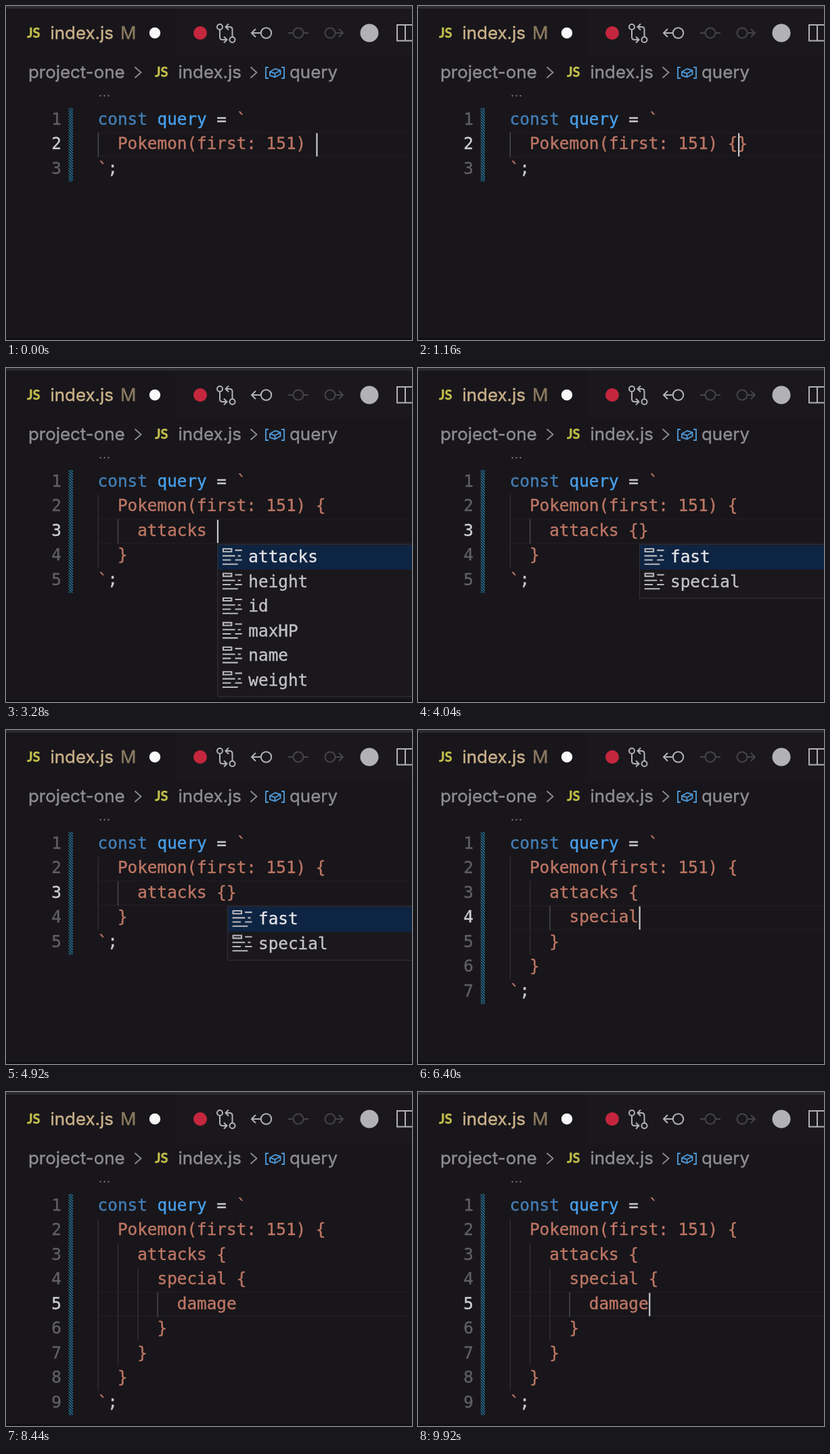
Animation, 600 px wide and 495 px high, one loop 10000 ms. Source, as an HTML page with a canvas:

```html
<!DOCTYPE html>
<html lang="en">
<head>
<meta charset="utf-8">
<title>Query completion</title>
<style>
html, body { margin: 0; width: 100%; height: 100%; overflow: hidden; background: #18161a; }
canvas { display: block; }
</style>
</head>
<body>
<canvas id="stage" width="600" height="495"></canvas>
<script>
const ctx = document.getElementById('stage').getContext('2d');
const LOOP = 10000, BLINK = 500;
const LEFT = 135.6, TOP = 151, ROW = 36.45, COL = 14.647;
const MONO = '24.33px "DejaVu Sans Mono", monospace';
const SANS = '25.9px Inter, sans-serif';
const BADGE = 'bold 20px Lato, sans-serif';
const BG = '#18161a', SALMON = '#bd7664', PLAIN = '#c8c8ca', ICON = '#b2b1b5', DIM = '#454448';

const ROOT = 'Pokemon(first: 151) ';
const OPEN = 'Pokemon(first: 151)';
const CREATURE = ['attacks', 'height', 'id', 'maxHP', 'name', 'weight'];
const ATTACKS = ['fast', 'special'];
const ATTACK = ['damage', 'id', 'name'];

// Each step: start time, nested lines down to the caret, suggestions, selected row.
const steps = [
  [-300, [ROOT]],
  [1040, [ROOT + '{']],
  [1180, [ROOT + '{'], CREATURE, 0],
  [2520, [OPEN, 'attacks']],
  [3080, [OPEN, 'attacks ']],
  [3180, [OPEN, 'attacks '], CREATURE, 0],
  [3400, [OPEN, 'attacks {']],
  [3560, [OPEN, 'attacks {'], ATTACKS, 0],
  [5500, [OPEN, 'attacks {'], ATTACKS, 1],
  [6200, [OPEN, 'attacks', 'special']],
  [6640, [OPEN, 'attacks', 'special ']],
  [6740, [OPEN, 'attacks', 'special '], ATTACKS, 0],
  [6840, [OPEN, 'attacks', 'special {']],
  [6960, [OPEN, 'attacks', 'special {'], ATTACK, 0],
  [7700, [OPEN, 'attacks', 'special', 'damage']]
].map(([at, path, menu, pick]) => ({ at, path, menu, pick }));

// The caret restarts its blink only when the text changes.
steps.forEach((step, i) => {
  const before = steps[i - 1];
  step.typedAt = before && before.path.join() === step.path.join() ? before.typedAt : step.at;
});

const colX = col => LEFT + col * COL;
const rowY = row => TOP + row * ROW;

// A hairline outline gives the text its slightly heavy weight.
function text(str, x, y, color, font = MONO, align = 'left') {
  ctx.font = font;
  ctx.fillStyle = ctx.strokeStyle = color;
  ctx.textAlign = align;
  ctx.lineWidth = 0.4;
  ctx.fillText(str, x, y);
  ctx.strokeText(str, x, y);
}

function code(str, col, row, color) {
  text(str, colX(col), rowY(row) + 25, color);
}

function rect(x, y, w, h, color) {
  ctx.fillStyle = color;
  ctx.fillRect(x, y, w, h);
}

function stroke(path, color, width = 2) {
  ctx.strokeStyle = color;
  ctx.lineWidth = width;
  ctx.stroke(new Path2D(path));
}

function circle(x, y, r, color, width) {
  ctx.beginPath();
  ctx.arc(x, y, r, 0, 2 * Math.PI);
  ctx.fillStyle = ctx.strokeStyle = color;
  ctx.lineWidth = width || 0;
  if (width) ctx.stroke(); else ctx.fill();
}

function drawHeader() {
  rect(250, 0, 350, 75, '#1a181d');
  rect(0, 0, 600, 4, '#2b2a2d');

  text('JS', 31, 47, '#c3bf4b', BADGE);
  text('index.js', 65.5, 49, '#cbb18a', SANS);
  text('M', 169, 48.5, '#8b7a60', SANS);
  circle(220, 40, 8.2, '#f8f8f8');

  circle(287, 40, 10, '#c4263d');
  circle(316, 31, 4, ICON, 2);
  circle(334.5, 50, 4, ICON, 2);
  stroke('M316 35V46Q316 50 320 50H326M322 45.5L326.5 50L322 54.5' +
         'M334.5 46V35Q334.5 31 330.5 31H325M329 26.5L324.5 31L329 35.5', ICON);
  circle(384.5, 40, 7.7, ICON, 2);
  stroke('M376 40H363M369 34L363 40L369 46', ICON);
  circle(432, 40, 7.5, DIM, 2);
  stroke('M417 40H424M440 40H447', DIM);
  circle(479, 40, 7.5, DIM, 2);
  stroke('M487 40H498M492 34L498 40L492 46', DIM);
  circle(537, 40, 13.5, ICON);
  stroke('M610 28H578V51.5H610M590 28V51.5', ICON);

  const crumb = '#8e8d91';
  text('project-one', 33, 107, crumb, SANS);
  stroke('M190.5 90.5L199.5 98.5L190.5 106.5', crumb, 1.8);
  text('JS', 220, 104.5, '#c3bf4b', BADGE);
  text('index.js', 254.5, 107, crumb, SANS);
  stroke('M361.5 90.5L370.5 98.5L361.5 106.5', crumb, 1.8);
  stroke('M388 91H384V107H388M407 91H411V107H407' +
         'M390 97.5L398 93L405.5 95.5V101L397.5 105.5L390 103ZM390 97.5L397.5 100L405.5 95.5M397.5 100V105.5',
         '#4d97d6', 1.9);
  text('query', 419, 107, crumb, SANS);
  for (const x of [139.5, 145.5, 151.5]) circle(x, 133, 1.2, '#737276');
}

function drawGutter(count, active) {
  for (let row = 0; row < count; row++) {
    text(row + 1, 82, rowY(row) + 25, row === active ? '#cfcfd1' : '#605f63', MONO, 'right');
  }
  const bottom = rowY(count);
  ctx.save();
  ctx.beginPath();
  ctx.rect(92.5, TOP, 6.5, bottom - TOP);
  ctx.clip();
  let stripes = '';
  for (let y = TOP - 8; y < bottom; y += 4) stripes += `M92 ${y}l8 8`;
  stroke(stripes, '#23759c', 1.3);
  ctx.restore();
}

function drawCode({ path }) {
  const depth = path.length, last = 2 * depth;
  rect(LEFT, rowY(depth) - 0.5, 464, 1, '#222024');
  rect(LEFT, rowY(depth + 1) - 1.5, 464, 1, '#222024');

  code('const', 0, 0, '#447fb7');
  code('query', 6, 0, '#489fea');
  code('=', 12, 0, PLAIN);
  code('`', 14, 0, SALMON);

  path.forEach((line, i) => {
    const inner = i === depth - 1;
    const tail = inner ? (line.endsWith('{') ? '}' : '') : ' {';
    rect(colX(2 * i), rowY(i + 1), 1.4, (last - 1 - 2 * i) * ROW, inner ? '#4d4c50' : '#302e32');
    code(line + tail, 2 * i + 2, i + 1, SALMON);
    if (!inner) code('}', 2 * i + 2, last - 1 - i, SALMON);
  });

  code('`', 0, last, SALMON);
  code(';', 1, last, PLAIN);
  drawGutter(last + 1, depth);
}

function drawFieldIcon(x, y) {
  ctx.save();
  ctx.translate(x, y);
  ctx.scale(2.07, 2.07);
  stroke('M1.5 2.5H7.5V4.5H1.5ZM10 3.5H15M1 7.5H10M12 7.5H14M1 10.5H7M10 10.5H15M1 13.5H12', '#b9b8bc', 1);
  ctx.restore();
}

function drawMenu({ menu, pick, path }, caretX) {
  const x = Math.min(caretX + 1, 467), y = rowY(path.length + 1) + 1;
  const height = menu.length * ROW + 7;
  rect(x, y, 640 - x, height, '#1a181c');
  rect(x, y + pick * ROW + 1, 640 - x, ROW, '#0e2443');
  ctx.strokeStyle = '#323036';
  ctx.lineWidth = 1.2;
  ctx.strokeRect(x + 0.5, y, 640 - x, height);
  menu.forEach((label, i) => {
    const top = y + i * ROW;
    drawFieldIcon(x + 5.5, top + 1.5);
    text(label, x + 46, top + 27, i === pick ? '#e2e2e6' : '#c2c1c5');
  });
}

function draw(time) {
  const step = steps.findLast(s => s.at <= time);
  const depth = step.path.length;
  const caretX = colX(2 * depth + step.path[depth - 1].length);

  rect(0, 0, 600, 495, BG);
  drawHeader();
  drawCode(step);
  if (Math.floor((time - step.typedAt) / BLINK) % 2 === 0) {
    rect(caretX + 0.5, rowY(depth) + 1, 2.2, ROW - 2, '#c9c9cb');
  }
  if (step.menu) drawMenu(step, caretX);
  rect(0, 492.5, 600, 2.5, '#0e0d10');
}

const start = performance.now();
function tick() {
  draw((performance.now() - start) % LOOP);
  requestAnimationFrame(tick);
}
tick();
</script>
</body>
</html>
```
